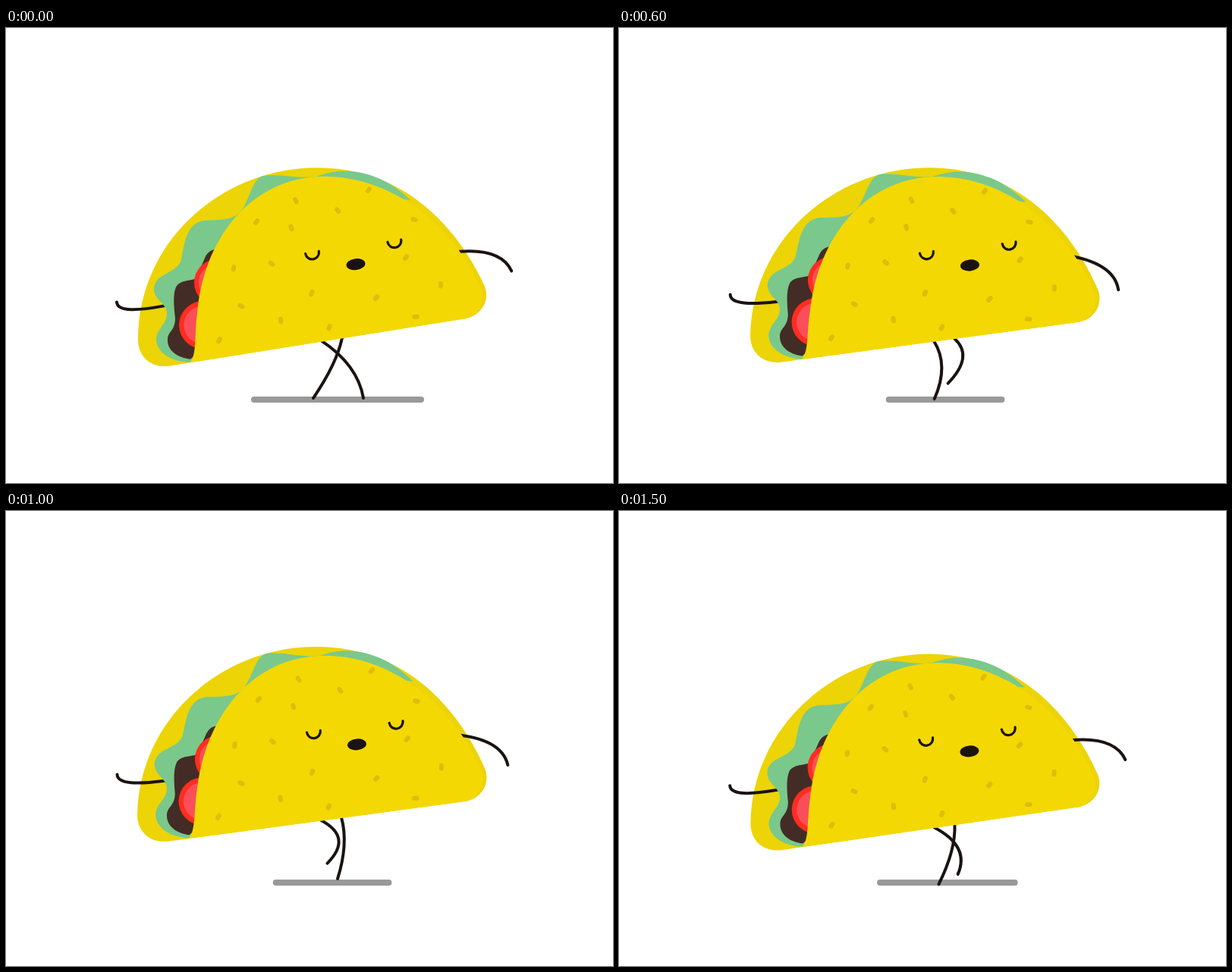
An HTML page for the animation above (1600 ms loop, 800 px wide and 600 px high).

```html
<!DOCTYPE html>
<html lang="en">
<head>
<meta charset="utf-8">
<title>Walking taco</title>
<style>
  html, body { margin: 0; width: 100%; height: 100%; overflow: hidden; background: #fff; }
  svg { display: block; width: 100%; height: 100%; }
  .line { fill: none; stroke: #1a1311; stroke-width: 4; stroke-linecap: round; }
  .eye { stroke-width: 3.2; }
  .back { fill: #ecd406; }
  .front { fill: #f4d804; }
  .lettuce { fill: #7ac88c; }
  .meat { fill: #432c25; }
  .rim { fill: #ff2d20; }
  .pulp { fill: #fa4f5a; }
  #specks { stroke: #dfbd0c; stroke-width: 6; stroke-linecap: round; }
  #shadow { stroke: #999; stroke-width: 8; stroke-linecap: round; }
</style>
</head>
<body>
<svg viewBox="0 0 800 600">
  <line id="shadow" y1="490" y2="490"/>
  <path id="legL" class="line"/>
  <path id="legR" class="line"/>
  <g id="body">
    <path class="back" d="M174 410C174 280 285 183.5 410 183.5C526 183.5 596 264 631 340C638 359 626 379 605 382.5L215 445C190 448 174 432 174 410Z"/>
    <path id="armL" class="line" d="M146 361C147 374 175 372 207 366L216 364"/>
    <path id="armR" class="line" d="M585 295.5C625 290.5 655 296.5 666 320.5"/>
    <path class="lettuce" d="M243 440C222 440 200 430 198 411C198 395 213 390 212 374C211 362 195 358 195 343C196 322 226 323 231 305C235 288 236 254 264 253C285 252 303 253 313 236C322 221 326 196 340 194C365 191 385 199 410 195C430 187 455 184 485 195C505 202 520 214 533 226L424 215L300 300L255 420Z"/>
    <path class="meat" d="M243 436C225 434 212 424 213 409C214 399 223 398 223 382C221 365 220 350 224 341C229 331 245 333 251 329L261 305C264 297 268 292 277 291L290 300L250 430Z"/>
    <circle class="rim" cx="279" cy="335" r="31"/>
    <circle class="pulp" cx="279" cy="335" r="25"/>
    <circle class="rim" cx="259.5" cy="391" r="31.5"/>
    <circle class="pulp" cx="259.5" cy="391" r="25"/>
    <path class="front" d="M243 440.5C252 427 248 405 252 375C260 280 321 195 420 195C515 195 594 268 626 343C632 360 622 379 605 382.5Z"/>
    <g id="specks"></g>
    <path class="line eye" d="M-9 0A9 9 0 0 0 9 0" transform="translate(403.5 295.3) rotate(-10)"/>
    <path class="line eye" d="M-9 0A9 9 0 0 0 9 0" transform="translate(511.8 280) rotate(-10)"/>
    <ellipse cx="461" cy="311" rx="12.5" ry="7.5" fill="#1a1311" transform="rotate(-7 461 311)"/>
  </g>
</svg>
<script>
const $ = id => document.getElementById(id);
const set = (id, attrs) => {
  for (const name in attrs) $(id).setAttribute(name, attrs[name]);
};

const LOOP = 1600, HALF = LOOP / 2, STEP = 100;
const PIVOT = [461, 311];

// drag: how far the foot lags behind its path, on the ground and in the air
const legs = {
  legL: { hip: [416, 412], offset: 0, mid: 427.5, reach: 43.5, bend: 10, drag: [9, -2] },
  legR: { hip: [443, 408], offset: HALF, mid: 436, reach: 31, bend: 6, drag: [4, 9] }
};

// Ordered from flat to steep, so that the angle follows from the index
const spots = '540,380 538,252 310,366 350,310 437,240 382,227 376,263 362,385 573,338 ' +
  '300,316 403,349 426,394 281,411 478,213 330,255 527,302 488,355';
$('specks').innerHTML = spots.split(' ').map((at, i) =>
  `<line x1="-1.8" x2="1.8" transform="translate(${at}) rotate(${130 * Math.sin(i / 32 * Math.PI)})"/>`).join('');

function place([x, y], angle, dx, dy) {
  const r = angle * Math.PI / 180, c = Math.cos(r), s = Math.sin(r);
  const [px, py] = PIVOT;
  return [px + dx + (x - px) * c - (y - py) * s, py + dy + (x - px) * s + (y - py) * c];
}

// Ground contact for half a loop, then a lifted swing forward
function legPath({ offset, mid, reach, bend, drag }, t, [hx, hy], bob) {
  const time = (t + offset) % LOOP;
  const air = time < HALF ? 0 : 1;
  const u = time % HALF / HALF;
  const arc = Math.sin(Math.PI * u);
  const lift = air * 26 * arc ** .7;
  const fx = mid + (air ? 1 : -1) * reach * (2 * u - 1) ** 3 - drag[air] * arc;
  const fy = 487.5 + .8 * bob - lift;
  const kx = (hx + fx) / 2 + 2 * bend + .9 * lift;
  const ky = (hy + fy) / 2 - 6;
  return `M${hx} ${hy}Q${kx} ${ky} ${fx} ${fy}`;
}

function draw(t) {
  const u = t % HALF / HALF;
  const squeeze = 1 - Math.abs(1 - 2 * u) ** 2.15;
  const bob = 34 * (u - .35) ** 2 - 3.5;
  const angle = 1.85 * squeeze, dx = 1.9 * squeeze;
  set('body', { transform: `translate(${dx} ${bob}) rotate(${angle} ${PIVOT})` });

  const mid = 437 - 9 * squeeze, half = 110 - 46 * squeeze;
  set('shadow', { x1: mid - half, x2: mid + half });

  for (const id in legs) {
    const hip = place(legs[id].hip, angle, dx, bob);
    set(id, { d: legPath(legs[id], t, hip, bob) });
  }

  const swing = Math.cos((t / LOOP + 1 / 16) * 2 * Math.PI);
  set('armR', { transform: `rotate(${6.8 - 8 * swing} 590 295)` });
  set('armL', { transform: `rotate(${1.4 - 1.4 * swing} 220 364)` });
}

function tick() {
  draw(Math.floor(performance.now() % LOOP / STEP) * STEP);
  requestAnimationFrame(tick);
}
tick();
</script>
</body>
</html>
```
